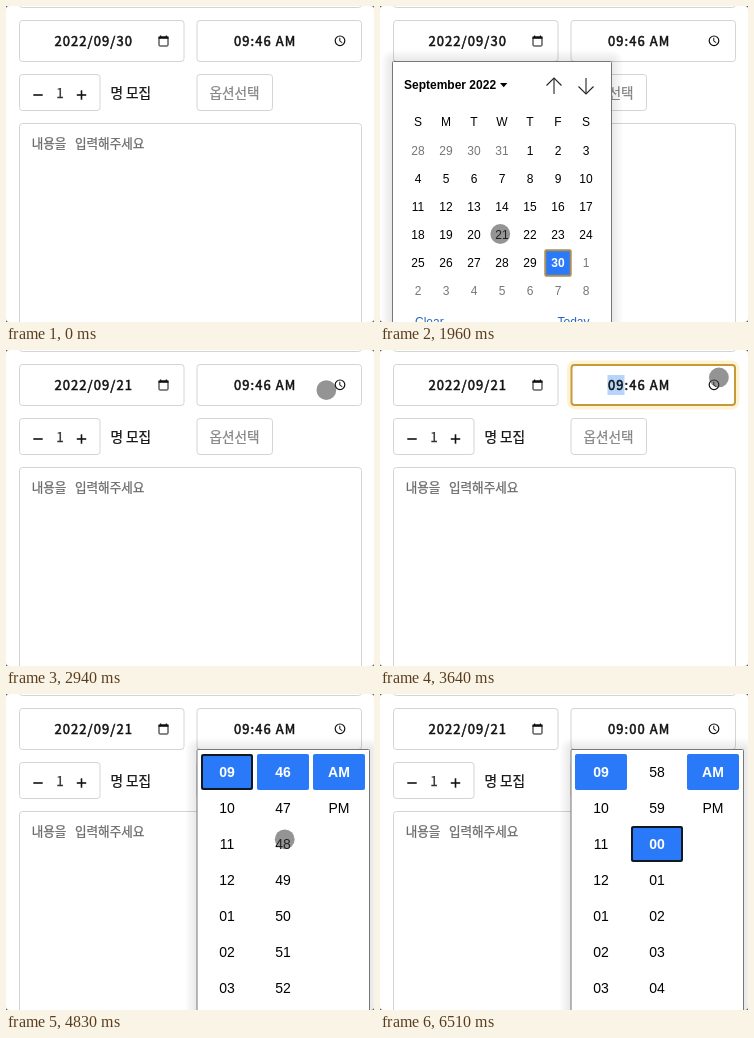
Animation of 368x316 px, one loop 6580 ms. Source, as an HTML page with a canvas:

```html
<!DOCTYPE html>
<html lang="ko">
<head>
<meta charset="utf-8">
<title>모집 글 작성</title>
<style>
  html, body { margin: 0; width: 100%; height: 100%; overflow: hidden; background: #fff; }
  canvas { display: block; width: 368px; height: 316px; }
</style>
</head>
<body>
<canvas id="stage"></canvas>
<script>
const W = 368, H = 316, LOOP = 6580, STEP = 70;
const KR = '"Noto Sans CJK KR", "Noto Sans CJK", sans-serif';
const UI = '"Liberation Sans", sans-serif';
const BLUE = '#2979f8', GOLD = '#c59a3c', LINE = '#d4d4d4';
const ROW = 36, CELL = 28;

const canvas = document.getElementById('stage');
const dpr = window.devicePixelRatio || 1;
canvas.width = W * dpr;
canvas.height = H * dpr;
const c = canvas.getContext('2d');
c.scale(dpr, dpr);

// Moments when something switches
const AT = {
  dateOpen: 1260, datePicked: 2240,
  timeFocus: 3220, timeOpen: 4340,
  scroll: 5040, scrollEnd: 5390,
  minutePicked: 5670, snap: 6510
};

// The pointer rests between moves; bend swings a move sideways
const home = { x: 195, y: 189 };
const moves = [
  { from: 70, to: 980, x: 157, y: 39, bend: -35 },
  { from: 1470, to: 1960, x: 120, y: 228, bend: 45 },
  { from: 2180, to: 3080, x: 334, y: 27, bend: 0 },
  { from: 3500, to: 4270, x: 337, y: 32, bend: 16 },
  { from: 4410, to: 4900, x: 275, y: 152, bend: 0 },
  { from: 5460, to: 5600, x: 278, y: 176, bend: 0 },
  { from: 5880, to: 6090, x: 220, y: 244, bend: 0 }
];

const pad = n => String(n).padStart(2, '0');
const progress = (t, from, to) => Math.min(1, Math.max(0, (t - from) / (to - from)));
const smooth = p => p * p * (3 - 2 * p);

function text(s, x, y, { size = 13, color = '#111', weight = 400, font = KR, align = 'left', gap = 0, heft = 0 } = {}) {
  c.font = `${weight} ${size}px ${font}`;
  c.letterSpacing = gap + 'px';
  c.textAlign = align;
  c.fillStyle = c.strokeStyle = color;
  c.fillText(s, x, y);
  if (heft) {
    c.lineWidth = heft;
    c.strokeText(s, x, y);
  }
}

function rect(x, y, w, h, color) {
  c.fillStyle = color;
  c.fillRect(x, y, w, h);
}

function box(x, y, w, h, r, stroke, fill, width = 1) {
  c.beginPath();
  c.roundRect(x, y, w, h, r);
  if (fill) { c.fillStyle = fill; c.fill(); }
  if (stroke) { c.strokeStyle = stroke; c.lineWidth = width; c.stroke(); }
}

function line(points, color, width) {
  c.beginPath();
  points.forEach(([x, y]) => c.lineTo(x, y));
  c.strokeStyle = color;
  c.lineWidth = width;
  c.stroke();
}

function circle(x, y, r) {
  c.beginPath();
  c.arc(x, y, r, 0, Math.PI * 2);
}

function calendarIcon(x, y) {
  box(x + .5, y + 1.5, 9, 9, .8, '#111');
  rect(x, y + 1, 10, 2.3, '#111');
  rect(x + 1.5, y, 1.2, 2, '#111');
  rect(x + 7.3, y, 1.2, 2, '#111');
}

function clockIcon(x, y) {
  circle(x, y, 4.8);
  c.strokeStyle = '#111';
  c.lineWidth = 1.2;
  c.stroke();
  line([[x - .2, y - 3], [x - .2, y + .4], [x + 2.3, y + 1.9]], '#111', 1);
}

function drawForm(t) {
  const date = t < AT.datePicked ? '2022/09/30' : '2022/09/21';
  const time = t < AT.minutePicked ? '09:46 AM' : '09:00 AM';
  const focused = t >= AT.timeFocus && t < AT.timeOpen;
  const value = { gap: 1.05, heft: .5 };
  const label = { size: 13.6, heft: .25 };

  box(13.5, -30, 342, 31.5, 3, LINE);
  box(13.5, 14.5, 164.5, 41, 3, LINE);
  text(date, 48.5, 40, value);
  calendarIcon(152.5, 29.5);

  if (focused) {
    box(191, 14.5, 164.5, 41, 4, '#fdf3d3', null, 8);
    box(191.5, 15, 163.5, 40, 3, GOLD, '#fff', 2);
    rect(227.5, 25, 17, 20, '#b6d5fb');
  } else {
    box(191, 14.5, 164.5, 41, 3, LINE);
  }
  text(time, 228, 40, value);
  clockIcon(334, 34.8);

  box(13.5, 68.5, 80.5, 36, 3, LINE);
  line([[27.3, 89], [36.7, 89]], '#111', 1.6);
  text('1', 54, 92, { ...label, color: '#333', align: 'center' });
  line([[70.8, 89], [80.2, 89]], '#111', 1.6);
  line([[75.5, 84.3], [75.5, 93.7]], '#111', 1.6);
  text('명 모집', 104.5, 92, label);

  box(191, 68.5, 75.5, 36, 3, LINE);
  text('옵션선택', 203.5, 92, { ...label, color: '#858585' });

  box(13.5, 117.5, 342, 230, 3, LINE);
  text('내용을   입력해주세요', 25.7, 142, { ...label, size: 12.6, color: '#6a6a6a' });
}

function popup(x, w) {
  for (let grow = 1; grow <= 11; grow++) {
    box(x - grow, 55 - grow, w + 2 * grow, H, grow, null, 'rgba(0,0,0,.009)');
  }
  box(x + .5, 55.5, w - 1, H, 1, '#777', '#fff');
}

function drawCalendar() {
  popup(12, 220);
  const small = { size: 12, font: UI, color: '#000' };
  const cell = { ...small, align: 'center' };
  text('September 2022', 24, 83, { ...small, weight: 700 });
  c.beginPath();
  c.moveTo(120, 77);
  c.lineTo(127.4, 77);
  c.lineTo(123.7, 81.2);
  c.fill();

  const arrow = (x, dir) => {
    const tip = 80 - 8 * dir;
    line([[x, tip], [x, 80 + 8 * dir]], '#222', 1.1);
    line([[x - 7.5, tip + 7.5 * dir], [x, tip], [x + 7.5, tip + 7.5 * dir]], '#222', 1.1);
  };
  arrow(174, 1);
  arrow(206, -1);

  [...'SMTWTFS'].forEach((d, i) => text(d, 38 + i * CELL, 120, cell));

  for (let i = 0; i < 42; i++) {
    const date = new Date(2022, 7, 28 + i);
    const day = date.getDate(), inMonth = date.getMonth() === 8;
    const x = 38 + (i % 7) * CELL, y = 145 + Math.floor(i / 7) * CELL;
    const chosen = inMonth && day === 30;
    if (chosen) box(x - 12.7, y - 12.7, 25.4, 25.4, 1, '#ab8d56', BLUE, 2);
    text(day, x, y + 4.3, {
      ...cell,
      weight: chosen ? 700 : 400,
      color: chosen ? '#fff' : inMonth ? '#000' : '#777'
    });
  }
  text('Clear', 35, 319.5, { ...small, color: '#2467bd' });
  text('Today', 209.5, 319.5, { ...small, color: '#2467bd', align: 'right' });
}

function item(label, x, y, chosen, focused) {
  if (chosen) box(x, y - ROW / 2, 52, ROW, 2, null, BLUE);
  if (focused) box(x + 1, y - 17, 50, 34, 2, '#101820', null, 2);
  text(label, x + 26, y + 4.7, {
    size: 14, font: UI, align: 'center',
    weight: chosen ? 700 : 400, color: chosen ? '#fff' : '#000'
  });
}

function minuteScroll(t) {
  if (t >= AT.snap) return 58;
  const p = progress(t, AT.scroll, AT.scrollEnd);
  return 46 + 11.76 * (1 - (1 - p) ** 2);
}

function drawTimeList(t) {
  popup(190.5, 173.5);
  const picked = t >= AT.minutePicked;
  const top = minuteScroll(t);
  c.save();
  c.beginPath();
  c.rect(191, 59, 172, H);
  c.clip();
  for (let i = 0; i < 8; i++) {
    item(pad((8 + i) % 12 + 1), 195, 78 + i * ROW, i === 0, i === 0 && !picked);
  }
  for (let m = Math.floor(top); m < top + 8; m++) {
    const chosen = m === (picked ? 60 : 46);
    item(pad(m % 60), 251, 78 + (m - top) * ROW, chosen, chosen && picked);
  }
  item('AM', 307, 78, true);
  item('PM', 307, 114);
  c.restore();
}

function drawPointer(t) {
  if (t < 2 * STEP || t >= moves.at(-1).to) return;
  let { x, y } = home;
  for (const m of moves) {
    const p = smooth(progress(t, m.from, m.to));
    x += (m.x - x) * p + m.bend * Math.sin(Math.PI * p);
    y += (m.y - y) * p;
  }
  circle(x + .3, y, 9.9);
  c.fillStyle = 'rgba(60,60,60,.55)';
  c.fill();
}

function drawCorners() {
  c.beginPath();
  c.rect(0, 0, W, H);
  c.roundRect(0, 0, W, H, 3);
  c.fillStyle = '#555';
  c.fill('evenodd');
}

function draw(t) {
  rect(0, 0, W, H, '#fff');
  drawForm(t);
  if (t >= AT.dateOpen && t < AT.datePicked) drawCalendar();
  if (t >= AT.timeOpen) drawTimeList(t);
  drawPointer(t);
  drawCorners();
}

const start = performance.now();
function tick() {
  const t = (performance.now() - start) % LOOP;
  draw(Math.floor(t / STEP) * STEP);
  requestAnimationFrame(tick);
}
tick();
</script>
</body>
</html>
```
